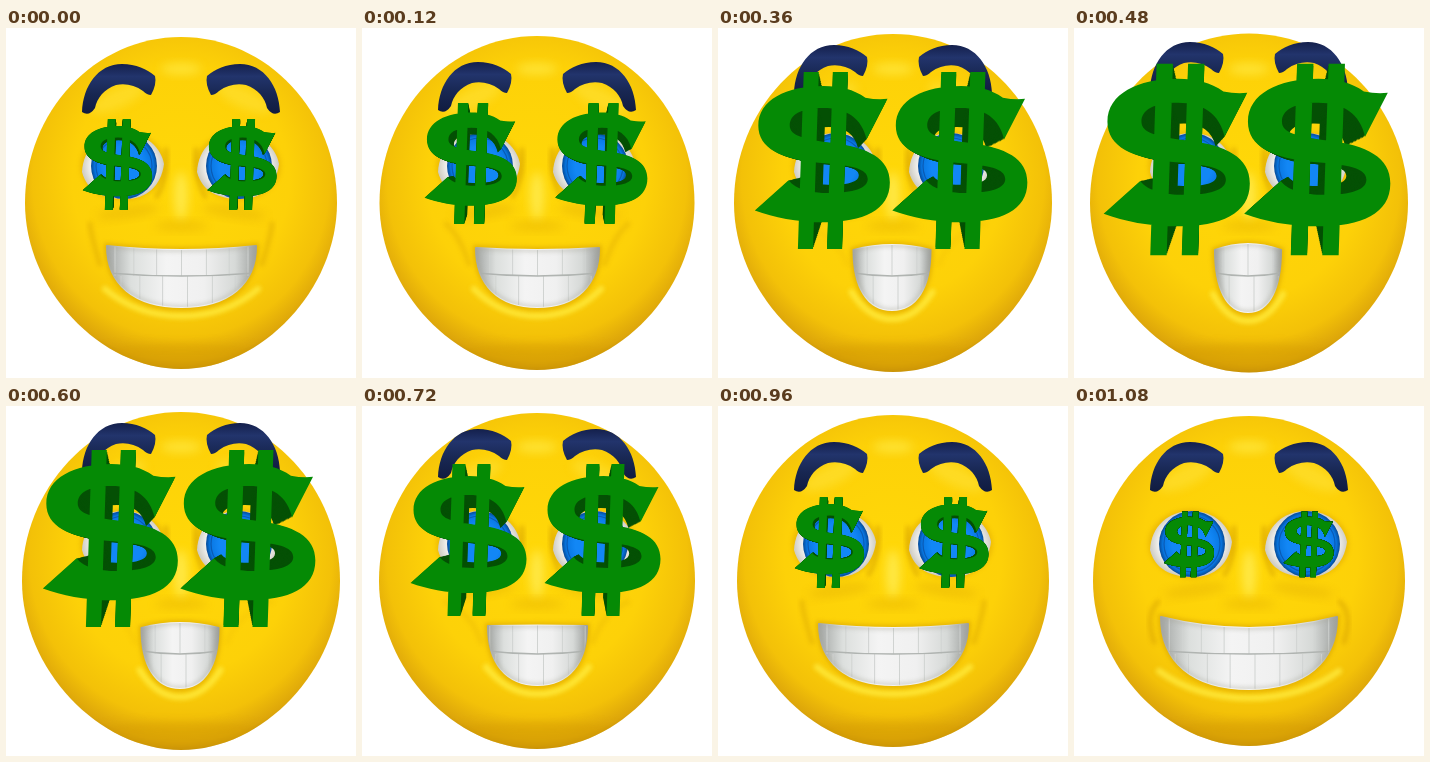
An HTML page that plays this animation: 350 px wide and 350 px high, repeating every 3.08 s.

```html
<!DOCTYPE html>
<html lang="en">
<head>
<meta charset="utf-8">
<title>Money eyes</title>
<style>
  html, body { margin: 0; width: 100%; height: 100%; overflow: hidden; background: #fff; }
  svg { display: block; width: 100vw; height: 100vh; }
</style>
</head>
<body>
<svg viewBox="0 0 350 350">
  <defs>
    <radialGradient id="skin" cx=".5" cy=".43" r=".58">
      <stop offset="0" stop-color="#ffd808"/>
      <stop offset=".6" stop-color="#fdd108"/>
      <stop offset=".82" stop-color="#f3c108"/>
      <stop offset=".94" stop-color="#dda60a"/>
      <stop offset="1" stop-color="#bd880a"/>
    </radialGradient>
    <linearGradient id="enamel">
      <stop offset="0" stop-color="#a3a6a4"/>
      <stop offset=".16" stop-color="#dcdfdd"/>
      <stop offset=".4" stop-color="#f4f4f4"/>
      <stop offset=".65" stop-color="#f0f0f0"/>
      <stop offset=".86" stop-color="#d6d9d7"/>
      <stop offset="1" stop-color="#9da09e"/>
    </linearGradient>
    <radialGradient id="eyeball">
      <stop offset=".7" stop-color="#fff"/>
      <stop offset="1" stop-color="#cfcdc4"/>
    </radialGradient>
    <radialGradient id="iris">
      <stop offset=".6" stop-color="#1287f5"/>
      <stop offset=".88" stop-color="#0877e2"/>
      <stop offset="1" stop-color="#054a97"/>
    </radialGradient>
    <linearGradient id="hair" x2="0" y2="1">
      <stop offset="0" stop-color="#14204c"/>
      <stop offset=".25" stop-color="#22346c"/>
      <stop offset=".6" stop-color="#182752"/>
      <stop offset="1" stop-color="#101b40"/>
    </linearGradient>
    <filter id="soft" x="-50%" y="-50%" width="200%" height="200%"><feGaussianBlur stdDeviation="5"/></filter>
    <filter id="fine" x="-50%" y="-50%" width="200%" height="200%"><feGaussianBlur stdDeviation="2.2"/></filter>
    <path id="dollar" d="M55-53L37-18C33-36 20-45 0-45C-20-45-29-39-29-30C-29-21-16-18 8-15
      C38-11 57-2 57 19C57 43 34 53 0 53C-24 53-42 49-59 43L-30 17C-24 25-10 28 4 28
      C26 28 38 24 38 16C38 7 24 4-4 2C-36-1-56-10-56-30C-56-52-32-64 0-64C14-64 26-61 36-54Q46-52 55-53Z
      M-17-76H-4L-9 76H-22Z M8-76H21L16 76H3Z"/>
    <path id="brow" d="M76 84C77 58 92 36 116 36C130 36 141 41 149 48Q151 56 145 67
      Q141 67 137 63C129 57 119 55 110 57C98 61 91 70 89 80Q83 89 76 84Z"/>
    <g id="eye">
      <ellipse rx="43" ry="35" fill="#d99d00" opacity=".4" filter="url(#fine)"/>
      <path d="M-41 6C-40-18-22-33 0-33C24-33 38-18 41-2C38 20 24 33 2 33C-20 33-36 25-41 6Z" fill="url(#eyeball)"/>
      <circle cx="1" r="33" fill="url(#iris)"/>
      <circle cx="1" r="28" fill="none" stroke="#0a5bb5" stroke-width="1.2"/>
    </g>
    <clipPath id="mouthClip"><path id="mouthShape"/></clipPath>
    <clipPath id="headClip"><path id="headShape"/></clipPath>
  </defs>
  <g id="scene"></g>
</svg>
<script>
const STEP = 120, LOOP = 3080;
const ORDER = [1, 2, 3, 4, 5, 4, 3, 2, 1, 0];

// Each property is listed from the resting face to the widest stare.
const POSES = {
  headX: [156, 156, 157.5, 158, 159, 159],
  headY: [165, 166, 167, 168, 169, 169.5],
  browY: [0, 0, -2, -13, -19, -22],
  size: [.43, .6, .796, 1, 1.164, 1.26],
  leftX: [115.5, 112, 109.5, 107.5, 105.5, 104],
  rightX: [235, 236.5, 240, 241.5, 243, 244.5],
  coinY: [138.5, 136.5, 135.5, 134, 132.5, 131.5],
  mouthX: [175, 175.5, 175.5, 175.5, 174, 174],
  mouthW: [88, 74.5, 61.5, 49.5, 38.5, 33],
  cornerY: [211, 218, 220, 220, 222, 222],
  lipY: [222, 222, 222, 219.5, 217, 216],
  chinY: [283, 279, 279, 279, 282, 284]
};
const $ = id => document.getElementById(id);
const mix = (a, b, t) => a + (b - a) * t;

function blob(x, y, rx, ry, color, opacity, angle = 0) {
  return `<ellipse rx="${rx}" ry="${ry}" fill="${color}" opacity="${opacity}" filter="url(#soft)"
    transform="translate(${x} ${y}) rotate(${angle})"/>`;
}

function mirrored(content) {
  return content + `<g transform="matrix(-1 0 0 1 350 0)">${content}</g>`;
}

function crease(d, color, width, opacity) {
  return `<path d="${d}" fill="none" stroke="${color}" stroke-width="${width}" opacity="${opacity}"
    stroke-linecap="round" filter="url(#fine)"/>`;
}

// Round on top, a little tighter towards the chin.
function headPath({ headX: rx, headY: ry }) {
  const c = 175, round = .552, chin = .52;
  return `M${c - rx} ${c}C${c - rx} ${c - ry * round} ${c - rx * round} ${c - ry} ${c} ${c - ry}
    C${c + rx * round} ${c - ry} ${c + rx} ${c - ry * round} ${c + rx} ${c}
    C${c + rx} ${c + ry * chin} ${c + rx * chin} ${c + ry} ${c} ${c + ry}
    C${c - rx * chin} ${c + ry} ${c - rx} ${c + ry * chin} ${c - rx} ${c}Z`;
}

function mouthPath({ mouthX: x, mouthW: w, cornerY: c, lipY: l, chinY: b }) {
  const side = mix(c, b, .62);
  return `M${x - w} ${c}Q${x} ${2 * l - c} ${x + w} ${c}
    C${x + w} ${side} ${x + w * .64} ${b} ${x} ${b}
    C${x - w * .64} ${b} ${x - w} ${side} ${x - w} ${c}Z`;
}

function head(p, pose) {
  const smile = 1 - pose / 5;
  const { mouthX: x, mouthW: w, chinY: chin } = p;
  return `<path d="${headPath(p)}" fill="url(#skin)"/>
    <g clip-path="url(#headClip)">
      ${mirrored(
        blob(112, 70, 30, 10, "#ffea50", .4, -25) +
        blob(122, 184, 32, 6, "#d8a000", .3, -8) +
        crease("M160 122Q162 150 151 168", "#cf9900", 5, .45) +
        crease(`M84 196Q${x - w - 16} 208 ${x - w - 7} 236`, "#d29b00", 5, .45 * smile))}
      ${blob(175, 41, 20, 6, "#ffee50", .6)}
      ${blob(175, 168, 7, 24, "#fff060", .7)}
      ${blob(175, 198, 26, 5, "#dca500", .35)}
      ${blob(175, 330, 95, 14, "#d59d00", .5)}
      ${crease(`M${x - w - 2} ${chin - 18}Q${x - w * .6} ${chin + 9} ${x} ${chin + 9}
        Q${x + w * .6} ${chin + 9} ${x + w + 2} ${chin - 18}`, "#ffec40", 6, .8)}
    </g>`;
}

function mouth(p) {
  const shape = mouthPath(p);
  const bite = 248;
  let gaps = "";
  for (let i = -4; i <= 4; i++) {
    const x = p.mouthX + Math.sin(i * .29) * 87;
    gaps += `M${x} 205V${bite}M${x + 6} ${bite}V290`;
  }
  return `<path d="${shape}" fill="none" stroke="#d09a04" stroke-width="6" opacity=".5" filter="url(#fine)"/>
    <path d="${shape}" fill="url(#enamel)" stroke="url(#enamel)" stroke-width="2" stroke-linejoin="round"/>
    <g clip-path="url(#mouthClip)" fill="none">
      <path d="${gaps}" stroke="#d0d3d1" stroke-width="1"/>
      <path d="M${p.mouthX - p.mouthW} ${bite - 3}Q${p.mouthX} ${bite + 3} ${p.mouthX + p.mouthW} ${bite - 3}"
        stroke="#b0b4b1" stroke-width="1.5"/>
      <path d="${shape}" stroke="#a5a498" stroke-width="4" opacity=".4" filter="url(#fine)"/>
    </g>`;
}

// Shrinking copies run from the eye out to the front face to give the sign its depth.
function coin(x, p, eyeX) {
  const layers = 14;
  const depth = Math.min(1, (p.size - .43) * 1.4);
  let out = "";
  for (let i = 0; i <= layers; i++) {
    const back = 1 - i / layers;
    const cx = mix(x, eyeX, back * .5 * depth);
    const cy = mix(p.coinY, 138, back * .4);
    const scale = p.size * (1 - .32 * depth * back);
    out += `<use href="#dollar" transform="translate(${cx} ${cy}) scale(${scale})"
      fill="${i === layers ? "#058a05" : "#045004"}"/>`;
  }
  return out;
}

function draw(pose) {
  const p = {};
  for (const key in POSES) p[key] = POSES[key][pose];
  $("mouthShape").setAttribute("d", mouthPath(p));
  $("headShape").setAttribute("d", headPath(p));
  $("scene").innerHTML = head(p, pose) + mouth(p) +
    `<use href="#eye" x="117" y="138"/><use href="#eye" x="232" y="138"/>
    <g transform="translate(0 ${p.browY})" fill="url(#hair)">
      <use href="#brow"/><use href="#brow" transform="matrix(-1 0 0 1 350 0)"/>
    </g>` +
    coin(p.leftX, p, 116) + coin(p.rightX, p, 235);
}

let shown = -1;
const start = performance.now();
function tick() {
  const time = (performance.now() - start) % LOOP;
  const pose = ORDER[Math.min(ORDER.length - 1, Math.floor(time / STEP))];
  if (pose !== shown) draw(shown = pose);
  requestAnimationFrame(tick);
}
tick();
</script>
</body>
</html>
```
